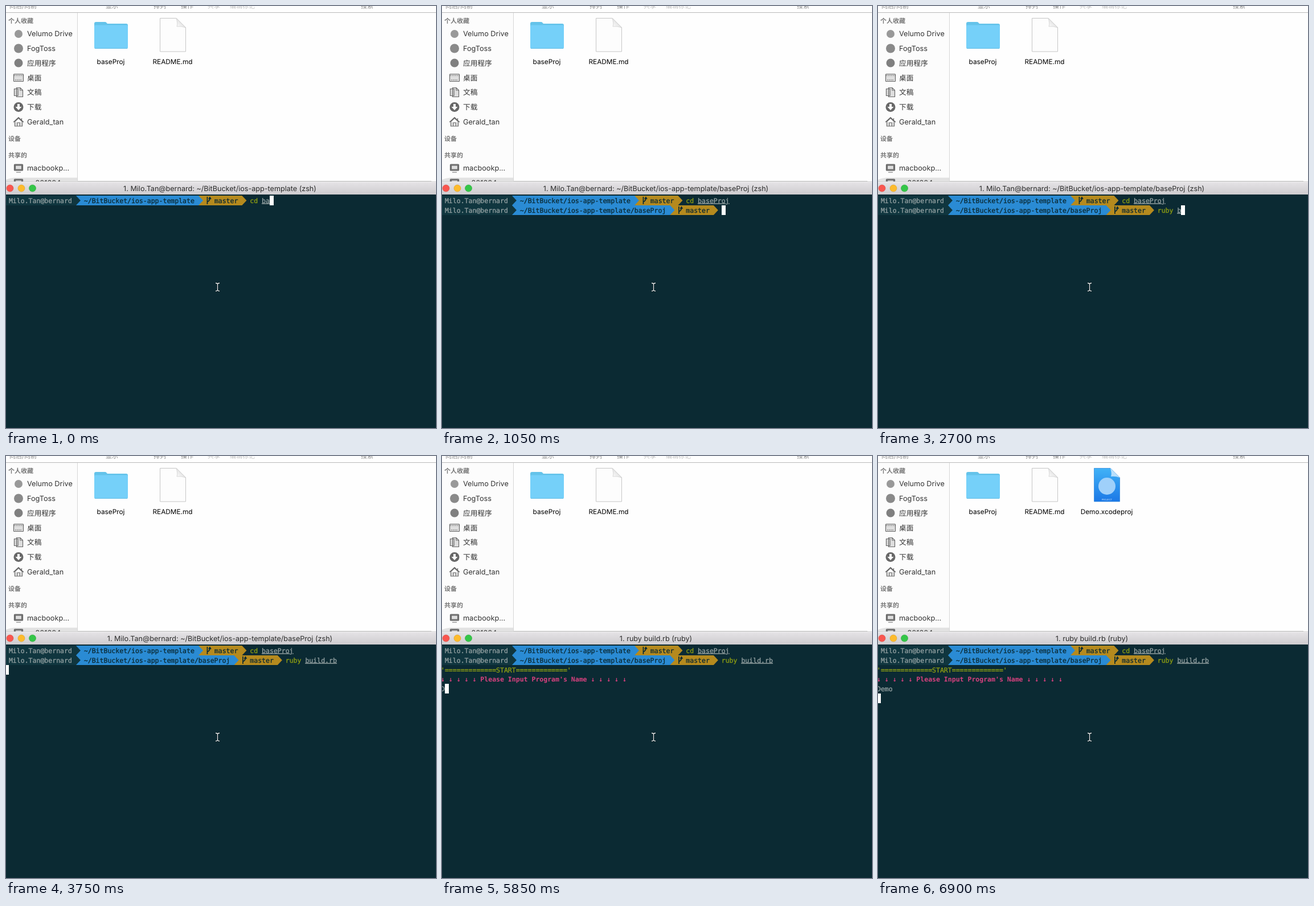
An HTML page that plays this animation: 755x741 px, repeating every 8 s.

```html
<!DOCTYPE html>
<html lang="zh">
<head>
<meta charset="utf-8">
<style>
html, body { margin: 0; width: 100%; height: 100%; overflow: hidden; background: #0b2a33 }
svg { display: block; text-rendering: geometricPrecision }
text { white-space: pre; font-family: Inter, "Noto Sans CJK SC", "Noto Sans CJK", sans-serif }
#term text { font: 11.53px "DejaVu Sans Mono", "Liberation Mono", monospace; stroke-width: .3 }
#side text { font-size: 12.7px; fill: #333 }
#side .head { font-size: 11px; font-weight: 700; fill: #777 }
#bar text { font-size: 11px; fill: #8c8c8c }
#bar .off { fill: #c4c4c4 }
.label { font-size: 11.8px; text-anchor: middle; fill: #000 }
.icon { fill: #dedede; stroke: #686868; stroke-width: 1.2 }
</style>
</head>
<body>
<svg width="755" height="741" viewBox="0 0 755 741">
  <defs>
    <linearGradient id="chrome" x2="0" y2="1"><stop stop-color="#e6e4e7"/><stop offset="1" stop-color="#cdcbce"/></linearGradient>
    <linearGradient id="blue" x2="0" y2="1"><stop stop-color="#41b2f7"/><stop offset="1" stop-color="#1b78e6"/></linearGradient>
    <linearGradient id="fold" x1="0" y1="1" x2="1" y2="0"><stop stop-color="#fff"/><stop offset="1" stop-color="#cfcfcf"/></linearGradient>
    <path id="sheet" d="M.5 .5H29L45.5 17V59H.5Z"/>
    <path id="corner" d="M29 .5Q32 10 30 15Q38 14 45.5 17Z"/>
    <path id="beam" d="M368 486.5Q371.5 486.5 371.5 489Q371.5 486.5 375 486.5M371.5 489V498M368 500.5Q371.5 500.5 371.5 498Q371.5 500.5 375 500.5"/>
    <g id="screen" class="icon">
      <rect x="14.5" y="-7" width="15" height="11" rx="1" fill="#777"/>
      <path d="M16.5 -5H27.5V2H16.5ZM18 7H26"/>
    </g>
  </defs>

  <rect width="755" height="310" fill="#fefefe"/>
  <rect y="12" width="125" height="298" fill="#fcfcfc"/>
  <g id="bar"></g>
  <path d="M0 11.5H755" stroke="#b9b9b9"/>
  <path d="M125.5 12V309" stroke="#d6d6d6"/>

  <g id="side">
    <path d="M0 305Q6 302 14 301.5H125V310H0Z" fill="#e2e2e2"/>
    <circle cx="22" cy="49" r="7" fill="#999"/>
    <circle cx="22" cy="74.5" r="8" fill="#8a8a8a"/>
    <circle cx="22" cy="100" r="7.5" fill="#808080"/>
    <g class="icon">
      <rect x="13.5" y="119.5" width="17" height="13" rx="1"/>
      <path d="M14 122H30M16 130H28" stroke-dasharray="2 1"/>
      <path d="M14.5 145.5H21V157.5H14.5ZM18.5 143.5H25L29.5 148V159.5H18.5ZM25 143.5V148H29.5"/>
      <circle cx="22" cy="177.5" r="8.5" fill="#686868" stroke="none"/>
      <path d="M20 172H24V177H27.5L22 183L16.5 177H20Z" fill="#fff" stroke="none"/>
      <path d="M13 204L22 195.5L31 204M27.5 197V200M15.5 203V211H28.5V203L22 197ZM20 211V205H24V211"/>
    </g>
    <use href="#screen" y="285"/>
    <use href="#screen" y="311"/>
  </g>

  <path d="M155 31Q155 28 158 28H174Q176 28 177 30L178 31H211Q214 31 214 34V45H155Z" fill="#64c3ea"/>
  <rect x="155" y="33.5" width="59" height="41.5" rx="2" fill="#75d0f9"/>
  <path d="M156 74.5H213" stroke="#62bde4"/>
  <text class="label" x="184" y="102">baseProj</text>

  <g transform="translate(270 21)">
    <use href="#sheet" fill="#fdfdfd" stroke="#c6c6c6"/>
    <use href="#corner" fill="url(#fold)" stroke="#cacaca" stroke-width=".7"/>
  </g>
  <text class="label" x="292.5" y="102">README.md</text>

  <g id="project">
    <g transform="translate(379 21)">
      <use href="#sheet" fill="url(#blue)" stroke="#2a83d8" stroke-width=".7"/>
      <use href="#corner" fill="#b9dffb"/>
      <circle cx="23" cy="32" r="15" fill="#9fd0fa"/>
      <text x="23" y="56.5" font-size="4" fill="#cfe8fd" text-anchor="middle">PROJECT</text>
    </g>
    <text class="label" x="401.5" y="102">Demo.xcodeproj</text>
  </g>

  <rect y="308" width="755" height="24" fill="url(#chrome)"/>
  <path d="M0 308.5H755" stroke="#d0d0d0"/>
  <path d="M0 309.5H755" stroke="#f0eff1"/>
  <path d="M126 307.5H747" stroke="#cfcfcf"/>
  <g stroke-width=".6">
    <circle cx="7" cy="320" r="6" fill="#f9564f" stroke="#d8453f"/>
    <circle cx="27" cy="320" r="6" fill="#fdbb2d" stroke="#dba023"/>
    <circle cx="46.5" cy="320" r="6" fill="#34c648" stroke="#28a637"/>
  </g>
  <text id="title" x="375.5" y="325" font-size="12.6" text-anchor="middle" fill="#2c2c2c"></text>
  <rect y="331" width="755" height="410" fill="#0b2a33"/>
  <g id="term"></g>
  <g fill="none">
    <use href="#beam" stroke="#06181d" stroke-width="3"/>
    <use href="#beam" stroke="#e8eced" stroke-width="1.3"/>
  </g>
</svg>

<script>
const $ = id => document.getElementById(id);
const CW = 6.94, RH = 17, LEFT = -2, TOP = 333;
const DARK = '#0b2a33', SLATE = '#10363f', BLUE = '#2a8bd4', GOLD = '#b58a1e',
      GREEN = '#8f9f12', GRAY = '#95a2a3', RED = '#dc322f', PINK = '#d8417f';
const colX = c => LEFT + c * CW, rowY = r => Math.round(TOP + r * 16.75);

// Fixed labels
const label = (x, y, s, cls = '') => `<text x="${x}" y="${y}" class="${cls}">${s}</text>`;
$('bar').innerHTML = [[6, '向后/向前'], [175, '显示'], [259, '排列'], [307, '操作'],
  [354, '共享', 'off'], [393, '编辑标记', 'off'], [623, '搜索']]
  .map(([x, s, c]) => label(x, 4, s, c)).join('');
$('side').innerHTML +=
  ['Velumo Drive', 'FogToss', '应用程序', '桌面', '文稿', '下载', 'Gerald_tan']
    .map((s, i) => label(37, 53.3 + i * 25.75, s)).join('') +
  label(37, 289, 'macbookp...') + label(37, 315, 'ps201604') +
  [[30, '个人收藏'], [237, '设备'], [265.5, '共享的']].map(([y, s]) => label(4, y, s, 'head')).join('');

// Terminal pieces
const put = (r, c, s, ink, attrs = '') =>
  `<text x="${colX(c)}" y="${rowY(r) + 12.6}" fill="${ink}" stroke="${ink}" ${attrs}>${s}</text>`;
const under = (r, c, s) => put(r, c, s, GRAY, 'text-decoration="underline"');
const cursor = (r, c) =>
  `<rect x="${Math.round(colX(c))}" y="${rowY(r)}" width="7" height="${RH}" fill="#fff"/>`;

// Segment from column a to b, ending in a pointed tip
function arrow(r, a, b, fill) {
  const y = rowY(r), x = colX(b);
  return `<path d="M${colX(a)} ${y}H${x}L${x + 8} ${y + RH / 2}L${x} ${y + RH}H${colX(a)}Z" fill="${fill}"/>`;
}

function prompt(r, path) {
  const end = 20 + path.length + 1, x = colX(end + 2), y = rowY(r);
  return arrow(r, end, end + 11, GOLD) + arrow(r, 18, end, BLUE) + arrow(r, 0, 18, SLATE) +
    put(r, 1, 'Milo.Tan@bernard', GRAY) + put(r, 20, path, DARK) +
    `<path d="M${x + 1.5} ${y + 2}V${y + 15}M${x + 1.5} ${y + 11}Q${x + 6} ${y + 9} ${x + 6} ${y + 4}M${x + 4} ${y + 6}L${x + 6} ${y + 3}L${x + 8} ${y + 6}" fill="none" stroke="${DARK}" stroke-width="1.7"/>` +
    put(r, end + 4, 'master', DARK);
}

// Last value whose start time has passed
const at = (t, steps) => steps.filter(s => s[0] <= t).pop()[1];

const HOME = '~/BitBucket/ios-app-template', PROJ = HOME + '/baseProj';
const shell = path => `1. Milo.Tan@bernard: ${path} (zsh)`;
const titles = [[0, shell(HOME)], [900, '1. cd baseProj (zsh)'], [1050, shell(PROJ)],
  [3900, '1. ruby build.rb (zsh)'], [4800, '1. ruby build.rb (ruby)']];
const folder = [[0, 'ba'], [150, 'baseProj/'], [900, 'baseProj']];
const command = [[0, ''], [1500, 'ru'], [1650, 'rub'], [1950, 'ruby'], [2250, 'ruby '],
  [2700, 'ruby b'], [2850, 'ruby bu'], [3000, 'ruby build.rb ']];
const answer = [[0, ''], [5850, 'D'], [6000, 'De'], [6150, 'Dem'], [6300, 'Demo']];

function terminal(t) {
  const dir = at(t, folder), cmd = at(t, command), name = at(t, answer);
  let out = prompt(0, HOME) + put(0, 62, 'cd', GREEN) + under(0, 65, dir);
  if (t >= 1050) {
    out += prompt(1, PROJ) + put(1, 71, cmd.slice(0, 4), cmd.length < 4 ? RED : GREEN) +
      under(1, 76, cmd.slice(5).trim());
  }
  if (t >= 4200) {
    const line = '='.repeat(13), arrows = '↓ ↓ ↓ ↓ ↓';
    out += put(2, 0, `'${line}START${line}'`, GREEN) +
      put(3, 0, `${arrows} Please Input Program's Name ${arrows}`, PINK, 'style="font-weight:700;stroke:none"') +
      put(4, 0, name, GRAY);
  }
  const [r, c] = t < 900 ? [0, 65 + dir.length] : t < 1050 ? [1, 0] :
    t < 3750 ? [1, 71 + cmd.length] : t < 4200 ? [2, 0] :
    t < 6600 ? [4, name.length] : [5, 0];
  return out + cursor(r, c);
}

let shown;
function draw(now) {
  const t = now % 8000, html = terminal(t);
  if (html !== shown) $('term').innerHTML = shown = html;
  $('title').textContent = at(t, titles);
  $('project').style.display = t < 6900 ? 'none' : '';
  requestAnimationFrame(draw);
}
draw(0);
</script>
</body>
</html>
```
